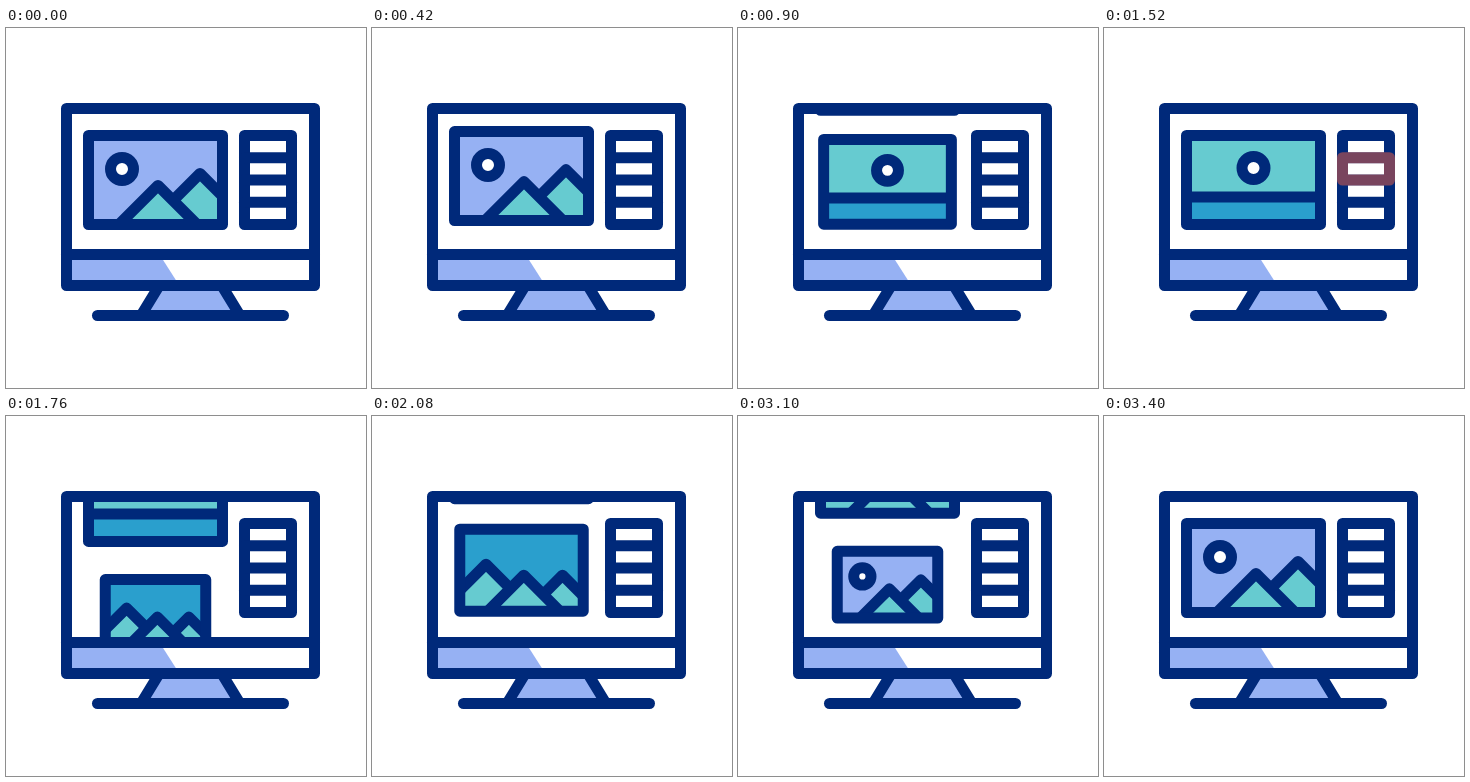
Write an HTML page with a canvas that moves like this. It is 360 by 360 pixels and loops after 3600 ms.

```html
<!DOCTYPE html>
<html lang="en">
<head>
<meta charset="utf-8">
<title>Screen gallery</title>
<style>
html, body { margin: 0; width: 100%; height: 100%; overflow: hidden; background: #fff; }
canvas { display: block; width: 360px; height: 360px; }
</style>
</head>
<body>
<canvas id="stage" width="360" height="360"></canvas>
<script>
const ctx = document.getElementById('stage').getContext('2d');
const NAVY = '#00297a', SKY = '#96b1f3', TEAL = '#66cbd0', BLUE = '#2a9fcd', WHITE = '#fff';
const LIT = '255,100,64';
const LOOP = 3600, LINE = 11, TRAVEL = 116;
const CENTER = { x: 149.5, y: 152 };
const FRAME = [[82.5, 107.5], [216.5, 107.5], [216.5, 196.5], [82.5, 196.5]];

// lit: row lights up; off: row fades; start/end: slide; size: scale of the incoming card
const steps = [
  { lit: 180, off: 400, start: 390, end: 1000, size: 0.785 },
  { lit: 1200, off: 1520, start: 1520, end: 2200, size: 0.75 },
  { lit: 2400, off: 2720, start: 2720, end: 3400, size: 0.75 }
];

const clamp = v => Math.max(0, Math.min(1, v));
const inOut = p => p < 0.5 ? 2 * p * p : 1 - 2 * (1 - p) * (1 - p);

// cubic-bezier(.25, .1, .25, 1)
function ease(p) {
  if (p <= 0 || p >= 1) return clamp(p);
  const curve = (a, b, u) => 3 * a * u * (1 - u) * (1 - u) + 3 * b * u * u * (1 - u) + u * u * u;
  let lo = 0, hi = 1;
  for (let i = 0; i < 24; i++) {
    const mid = (lo + hi) / 2;
    if (curve(0.25, 0.25, mid) < p) lo = mid; else hi = mid;
  }
  return curve(0.1, 1, lo);
}

function trace(points, closed) {
  ctx.beginPath();
  points.forEach(([x, y]) => ctx.lineTo(x, y));
  if (closed) ctx.closePath();
}

function shape(points, fill, stroke = NAVY, closed = true) {
  trace(points, closed);
  if (fill) { ctx.fillStyle = fill; ctx.fill(); }
  if (stroke) { ctx.strokeStyle = stroke; ctx.stroke(); }
}

const line = (...points) => shape(points, null, NAVY, false);
const box = (x1, y1, x2, y2) => [[x1, y1], [x2, y1], [x2, y2], [x1, y2]];

// Places a card by scaling its points, so line weight stays constant.
function card(kind, dy, k) {
  const at = ([x, y]) => [CENTER.x + (x - CENTER.x) * k, CENTER.y + dy + (y - CENTER.y) * k];
  const poly = (points, fill, stroke) => shape(points.map(at), fill, stroke);
  const path = points => line(...points.map(at));
  const ring = (x, y) => {
    ctx.beginPath();
    ctx.arc(...at([x, y]), 11.5 * k, 0, Math.PI * 2);
    ctx.fillStyle = WHITE;
    ctx.fill();
    ctx.strokeStyle = NAVY;
    ctx.stroke();
  };
  const hill = (points, base) => {
    poly([...points, ...base], TEAL, null);
    path(points);
  };
  const front = () => hill([[113, 196.5], [152, 157.5], [191, 196.5]], []);
  const corner = [[216.5, 196.5], [191, 196.5]];

  ctx.save();
  trace(FRAME.map(at), true);
  ctx.clip();
  poly(FRAME, [SKY, TEAL, BLUE][kind], null);
  if (kind === 0) {
    ring(116, 141);
    hill([[167.5, 172], [194, 145.5], [216.5, 168]], corner);
    front();
  } else if (kind === 1) {
    ring(149.5, 140);
    poly(box(82.5, 169, 216.5, 196.5), BLUE, null);
    path([[82.5, 169], [216.5, 169]]);
  } else {
    hill([[82.5, 174], [111, 145.5], [137.5, 172]], [[113, 196.5], [82.5, 196.5]]);
    hill([[173, 178.5], [194, 157.5], [216.5, 180]], corner);
    front();
  }
  ctx.restore();
  poly(FRAME, null);
}

function monitor() {
  ctx.fillStyle = SKY;
  shape([[62, 228], [154.5, 228], [173, 257], [62, 257]], SKY, null);
  line([60.5, 226.5], [308.5, 226.5]);
  shape([[153, 258], [216, 258], [234, 287.5], [135, 287.5]], SKY, null);
  line([153, 258], [135, 287.5]);
  line([216, 258], [234, 287.5]);
  line([91.5, 287.5], [277.5, 287.5]);
  shape(box(60.5, 80.5, 308.5, 257.5), null);
}

function sidebar(t) {
  const rowY = i => 107.5 + 22.25 * i;
  shape(box(238.5, rowY(0), 285.5, rowY(4)), WHITE);
  for (let i = 1; i < 4; i++) line([238.5, rowY(i)], [285.5, rowY(i)]);
  steps.forEach((s, i) => {
    const a = Math.min(clamp((t - s.lit + 20) / 60), clamp((s.off + 20 - t) / 40));
    if (a > 0) shape(box(238.5, rowY(i), 285.5, rowY(i + 1)), null, `rgba(${LIT},${a})`);
  });
}

function gallery(t) {
  ctx.save();
  ctx.beginPath();
  ctx.rect(60, 80, 249, 146);
  ctx.clip();
  const i = steps.findIndex(s => t < s.end);
  if (i < 0) {
    card(0, 0, 1);
  } else {
    const s = steps[i];
    const p = ease((t - s.start) / (s.end - s.start));
    const grow = inOut(clamp((t - s.end + 300) / 300));
    card(i, -TRAVEL * p, 1);
    if (p > 0) card((i + 1) % 3, TRAVEL * (1 - p), s.size + (1 - s.size) * grow);
  }
  ctx.restore();
}

function draw(t) {
  ctx.fillStyle = WHITE;
  ctx.fillRect(0, 0, 360, 360);
  ctx.lineWidth = LINE;
  ctx.lineCap = ctx.lineJoin = 'round';
  gallery(t);
  monitor();
  sidebar(t);
}

const begin = performance.now();
function tick() {
  draw((performance.now() - begin) % LOOP);
  requestAnimationFrame(tick);
}
tick();
</script>
</body>
</html>
```
